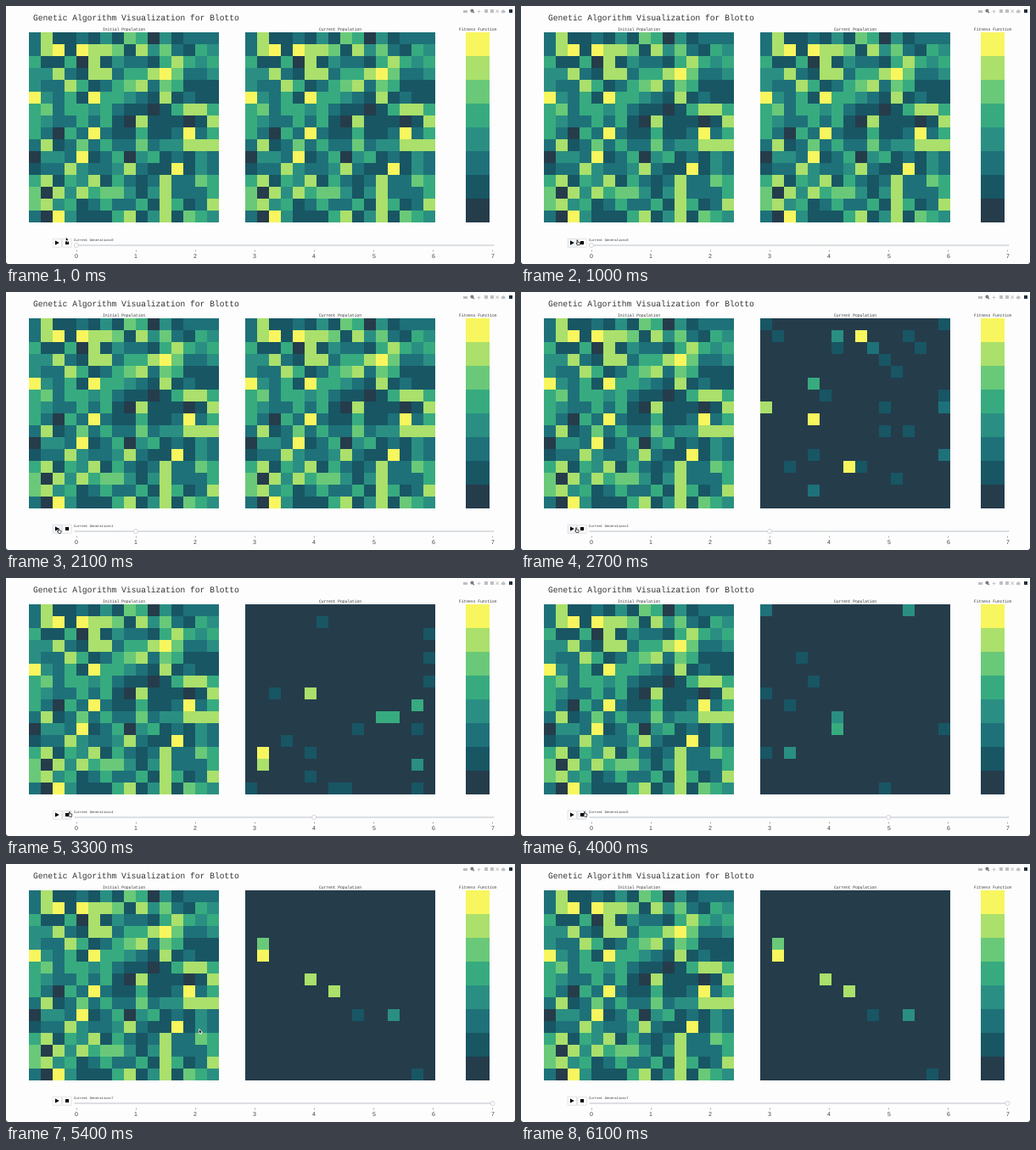
A matplotlib script that plays this animation: 600 px wide and 304 px high, repeating every 6.9 s.

```python
import matplotlib.pyplot as plt
import numpy as np
from matplotlib.animation import FuncAnimation
from matplotlib.colors import ListedColormap
from matplotlib.patches import Circle, FancyBboxPatch, Polygon, Rectangle

W, H, DPI = 600, 304, 100
FRAMES, STEP = 69, 100
N, CELL, TOP = 16, 14, 31
LAST = 7

PALETTE = ListedColormap(["#253c4b", "#185664", "#1e7179", "#2a8f82",
                          "#37ab7f", "#69c979", "#aae06b", "#f8f65e"])
INK, GRAY, PAPER = "#333333", "#bdbfc2", "#fdfdfd"

plt.rcParams["text.hinting"] = "none"
fig = plt.figure(figsize=(W / DPI, H / DPI), dpi=DPI, facecolor=PAPER)
ax = fig.add_axes([0, 0, 1, 1])


# ---------- populations ----------
def first_population(seed=12):
    """Mixed scores with one tall light column and the best candidates."""
    rng = np.random.default_rng(seed)
    g = rng.choice(LAST, size=(N, N), p=[.04, .2, .29, .16, .17, .04, .1])
    g[12:, 11] = g[9, 13:] = g[6, 13:15] = 6
    best = [(1, 2), (1, 4), (3, 11), (5, 0), (5, 5),
            (8, 5), (8, 13), (10, 4), (11, 12), (15, 2)]
    g[tuple(zip(*best))] = 7
    return g


def evolved(k, *peaks):
    """Converged grid: faint mutants thin out, a few peaks stand out."""
    rng = np.random.default_rng(k)
    g = np.zeros((N, N), int)
    count = 38 - 5 * k
    rows, cols = rng.integers(0, N, (2, count))
    g[rows, cols] = rng.choice([1, 2, 3, 4], count, p=[.75, .12, .06, .07])
    for r, c, level in peaks:
        g[r, c] = level
    return g


start = first_population()
generations = [start, start, evolved(2),
               evolved(3, (1, 8, 7), (8, 4, 7), (12, 7, 7), (7, 0, 6)),
               evolved(4, (12, 1, 7), (13, 1, 6), (7, 5, 6)),
               evolved(5),
               evolved(6, (2, 12, 6), (3, 3, 6), (15, 8, 5)),
               evolved(7, (5, 1, 7), (4, 1, 5), (7, 5, 6), (8, 7, 6))]


# ---------- drawing helpers ----------
def heat(data, x, w):
    return ax.imshow(data, cmap=PALETTE, vmin=0, vmax=LAST, aspect="auto",
                     interpolation="nearest",
                     extent=[x, x + w, TOP + N * CELL, TOP])


def label(x, y, s, px, ha="left", font="Liberation Mono", color=INK):
    return ax.text(x, y, s, fontsize=px * 72 / DPI, family=font, ha=ha,
                   va="baseline", color=color)


def line(xs, ys, color, lw=.6):
    ax.plot(xs, ys, color=color, lw=lw * 72 / DPI, solid_capstyle="butt")


def box(x, y, w, h, fc):
    ax.add_patch(Rectangle((x, y), w, h, fc=fc, ec="none", zorder=3))


def shape(points, fc):
    ax.add_patch(Polygon(points, fc=fc, ec="none", zorder=3))


def pill(x, y, w, h, fc, ec):
    return ax.add_patch(FancyBboxPatch(
        (x, y), w, h, boxstyle="round,pad=0,rounding_size=.7",
        fc=fc, ec=ec, lw=.45))


def toolbar():
    box(538.8, 4.6, 4.8, 3.2, GRAY)
    ax.add_patch(Circle((549.4, 5.6), 1.5, fc="#8a8d91", ec="#5f6367", lw=.6))
    line([550.5, 552], [6.8, 8.2], "#5f6367", 1)
    line([555, 559.4], [6.2, 6.2], GRAY, .8)
    line([557.2, 557.2], [4, 8.4], GRAY, .8)
    box(564, 4.2, 4, 4, GRAY)
    box(570.6, 4.2, 4, 4, GRAY)
    line([577.4, 581], [4.4, 8], GRAY, .8)
    line([577.4, 581], [8, 4.4], GRAY, .8)
    shape([(583.6, 6.2), (586.2, 4), (588.8, 6.2), (588, 8.2), (584.4, 8.2)],
          GRAY)
    box(592.8, 4, 4.4, 4.4, "#23303d")


def knob_x(k):
    return 82.8 + 70.1 * k


# ---------- static scene ----------
heat(start, 27, N * CELL)
current = heat(start, 282, N * CELL)
heat(np.arange(LAST, -1, -1)[:, None], 542, 28)

label(32, 17, "Genetic Algorithm Visualization for Blotto", 9.64)
for x, s in ((138.6, "Initial Population"), (394, "Current Population"),
             (556, "Fitness Function")):
    label(x, 28.6, s, 4.58, "center")
toolbar()

play = pill(55, 274.2, 10.6, 10, PAPER, "#d4d7da")
stop = pill(66.6, 274.2, 10.6, 10, PAPER, "#d4d7da")
shape([(58, 276.4), (58, 281.6), (62.8, 279)], "k")
box(69.8, 276.9, 4.2, 4.2, "k")

pill(81, 281.4, 494, 1.1, "#eceef0", "#cfd3d7")
for k in range(LAST + 1):
    line([knob_x(k)] * 2, [287, 289.4], "#777777")
    label(knob_x(k), 297.2, str(k), 7, "center", "Liberation Sans", "#444444")
for x, s in ((0, 1), (W, -1)):
    shape([(x, H), (x + 2 * s, H), (x, H - 2)], "#444444")

knob = ax.add_patch(Circle((knob_x(0), 282), 2.5, fc="#fbfbfc", ec="#c3c8cd",
                           lw=.45, zorder=4))
caption = label(80, 277.1, "", 3.93)

ARROW = np.array([(0, 0), (0, 5.6), (1.3, 4.5), (2.2, 6.3), (3, 5.9),
                  (2.2, 4.2), (3.9, 4.1)])
HAND = np.array([(0, 0), (.9, 0), (1.2, 2), (3.6, 2.7), (3.5, 4.6),
                 (2.9, 5.8), (.9, 5.8), (-.9, 3.6), (-.3, 3.1), (.2, 3.4)])
cursor = ax.add_patch(Polygon(ARROW, lw=.5, zorder=6))

ax.set_xlim(0, W)
ax.set_ylim(H, 0)
ax.axis("off")


# ---------- motion ----------
def generation_at(ms):
    return int(np.clip((ms - 1200) // 500, 0, LAST))


def shown_at(ms):
    """Grid and knob lag the caption by one tick in the later steps."""
    k = generation_at(ms)
    return generation_at(ms - STEP) if k > 3 else k


def cursor_at(ms):
    t = [0, 600, 1000, 1500, 2600, 3000, 5200, 5900]
    x = [70.3, 66, 66, 61.4, 61.4, 74.2, 74.6, 610]
    y = [271.8, 276, 276, 278.6, 278.6, 275.6, 275.4, -8]
    return np.interp(ms, t, x), np.interp(ms, t, y)


def update(i):
    ms = i * STEP
    k = shown_at(ms)
    current.set_data(generations[k])
    knob.center = knob_x(k), 282
    caption.set_text(f"Current Generation={generation_at(ms)}")

    x, y = cursor_at(ms)
    hand = 500 <= ms <= 5200
    cursor.set_xy((HAND if hand else ARROW) + (x, y))
    cursor.set_facecolor("#f4f4f4" if hand else "k")
    cursor.set_edgecolor("#222222" if hand else "#ffffff")
    cursor.set_visible(ms < 5900)
    for button, left in ((play, 55), (stop, 66.6)):
        over = hand and left <= x < left + 11.6
        button.set_facecolor("#f0f4f8" if over else PAPER)
    return current, knob, caption, cursor, play, stop


anim = FuncAnimation(fig, update, frames=FRAMES, interval=STEP, repeat=True,
                     repeat_delay=0, blit=False)
plt.show()
```
